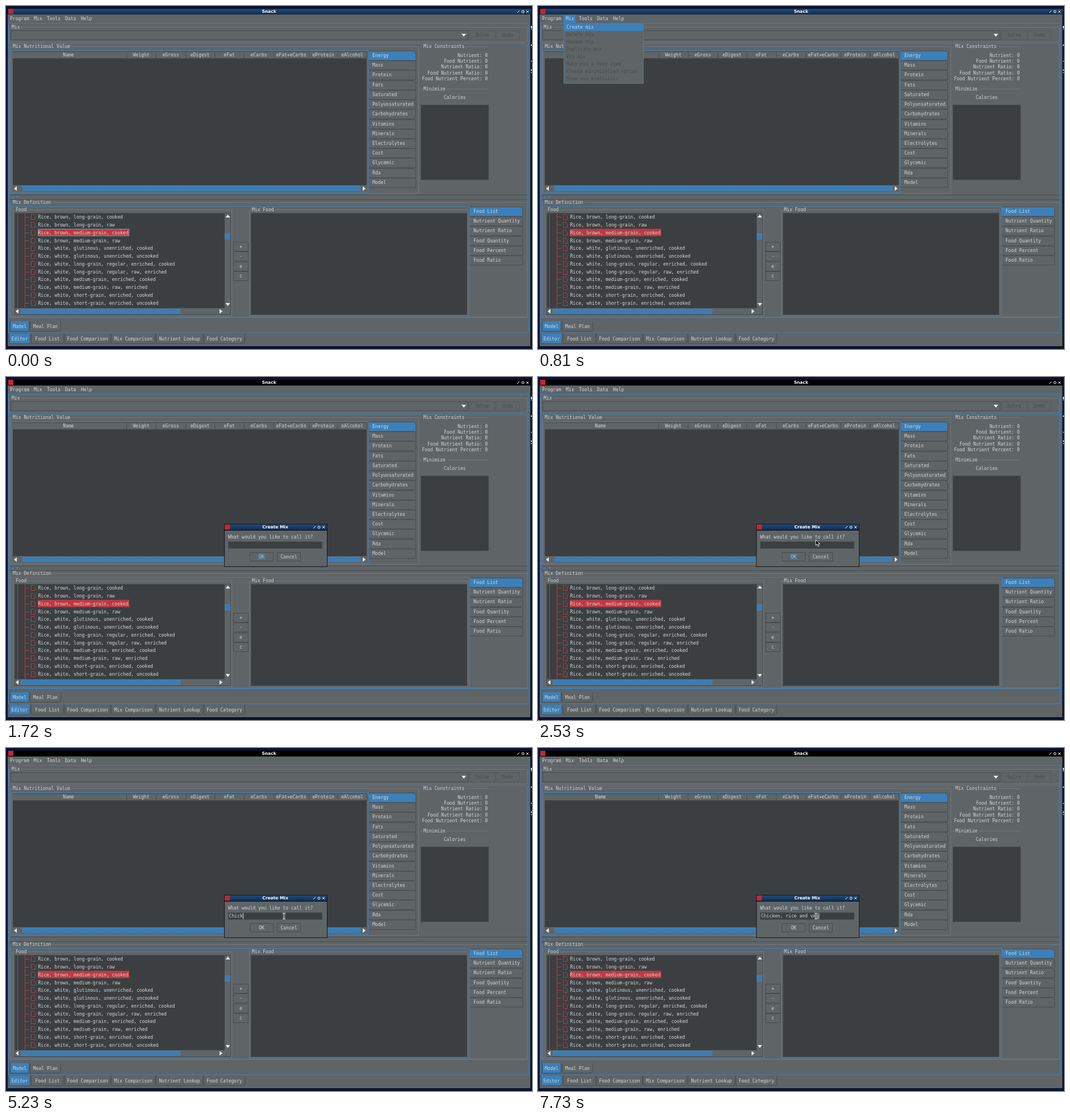
These frames come from a looping animation (926x605 px, 8000 ms). An HTML page with a canvas:

```html
<!DOCTYPE html>
<html lang="en">
<head>
<meta charset="utf-8">
<title>Snack</title>
<style>
html, body { margin: 0; width: 100%; height: 100%; overflow: hidden; background: #0b1238; }
canvas { display: block; }
</style>
</head>
<body>
<canvas id="stage" width="926" height="605"></canvas>
<script>
const ctx = document.getElementById('stage').getContext('2d');
const LOOP = 8000;
const MONO = '8px "DejaVu Sans Mono", monospace';
const BOLD = 'bold 7.5px "DejaVu Sans", sans-serif';
const GREY = '#5f6467', DARK = '#3c3f41', EDGE = '#484c4f', ETCH = '#71777a';
const BLUE = '#3c80b9', RED = '#bd3a42', INK = '#d6d8da', OFF = '#484c4e';

const MENU = ['Create mix', 'Delete mix', 'Rename mix', 'Duplicate mix', 'Pin mix',
  'Make mix a food item', 'Choose minimization option', 'Show mix statistics'];
const GROUPS = ['Energy', 'Mass', 'Protein', 'Fats', 'Saturated', 'Polyunsaturated',
  'Carbohydrates', 'Vitamins', 'Minerals', 'Electrolytes', 'Cost', 'Glycemic', 'Rda', 'Model'];
const DEFS = ['Food List', 'Nutrient Quantity', 'Nutrient Ratio', 'Food Quantity',
  'Food Percent', 'Food Ratio'];
const COLS = [['Name', 212], ['Weight', 264], ['eGross', 316], ['eDigest', 367], ['eFat', 419],
  ['eCarbs', 471], ['eFat+eCarbs', 533], ['eProtein', 584], ['eAlcohol', 635]];
const FOODS = ['brown, long-grain, cooked', 'brown, long-grain, raw',
  'brown, medium-grain, cooked', 'brown, medium-grain, raw',
  'white, glutinous, unenriched, cooked', 'white, glutinous, unenriched, uncooked',
  'white, long-grain, regular, enriched, cooked', 'white, long-grain, regular, raw, enriched',
  'white, medium-grain, enriched, cooked', 'white, medium-grain, raw, enriched',
  'white, short-grain, enriched, cooked', 'white, short-grain, enriched, uncooked'];
const TYPED = 'Chicken, rice and veg';
const KEYS = [4370, 4780, 4890, 5120, 5230, 5400, 5460, 5780, 5930, 6050, 6210, 6310, 6510,
  6680, 6850, 6950, 7050, 7150, 7240, 7470, 7730];

// Pointer stops: time, x, y
const POINTER = [[2070, 457, 264], [2110, 468, 280], [2150, 480, 298], [2190, 487, 307],
  [2370, 487, 304], [2410, 487, 300], [2450, 488, 296], [2490, 488, 291], [2530, 489, 287],
  [3040, 490, 288], [3220, 490, 291], [3270, 490, 292], [3310, 490, 294], [3360, 490, 296],
  [3540, 489, 298], [3810, 489, 297], [3850, 489, 296]];

function fill(x, y, w, h, color) {
  ctx.fillStyle = color;
  ctx.fillRect(x, y, w, h);
}

function frame(x, y, w, h, color) {
  ctx.strokeStyle = color;
  ctx.lineWidth = 1;
  ctx.strokeRect(x + .5, y + .5, w - 1, h - 1);
}

function path(points, color, filled, width = 1) {
  ctx.beginPath();
  points.forEach(([x, y]) => ctx.lineTo(x, y));
  ctx.fillStyle = ctx.strokeStyle = color;
  ctx.lineWidth = width;
  if (filled) ctx.fill(); else ctx.stroke();
}

// y is the middle of the line
function label(s, x, y, color = INK, align = 'left', font = MONO) {
  ctx.font = font;
  ctx.textAlign = align;
  ctx.fillStyle = color;
  ctx.fillText(s, x, Math.round(y + 2.7));
}

// Without a height only the top line is drawn
function titled(s, x, y, w, h) {
  if (h) frame(x, y, w, h, ETCH);
  else fill(x, y, w, 1, ETCH);
  fill(x + 3, y - 1, s.length * 4.82 + 4, 3, GREY);
  label(s, x + 5, y);
}

function button(s, x, y, w, h, ink = INK, edge = EDGE) {
  frame(x, y, w, h, edge);
  label(s, x + w / 2, y + h / 2, ink, 'center');
}

function triangle(x, y, dx, dy) {
  path([[x + dx * 3, y + dy * 3], [x - dx * 2 - dy * 4, y - dy * 2 - dx * 4],
    [x - dx * 2 + dy * 4, y - dy * 2 + dx * 4]], '#eef0f1', true);
}

function thumb(x, y, w, h) {
  fill(x, y, w, h, BLUE);
  ctx.fillStyle = '#31658f';
  for (let j = 2; j < h - 1; j += 2)
    for (let i = 2 + j % 4; i < w - 2; i += 4) ctx.fillRect(x + i, y + j, 1, 1);
}

function tabShape(x, y, w, h, selected, down) {
  ctx.beginPath();
  if (down) {
    ctx.moveTo(x + .5, y);
    ctx.lineTo(x + .5, y + h - .5);
    ctx.lineTo(x + w - 4, y + h - .5);
    ctx.quadraticCurveTo(x + w - .5, y + h - .5, x + w - .5, y + h - 4);
    ctx.lineTo(x + w - .5, y);
  } else {
    ctx.moveTo(x, y + .5);
    ctx.lineTo(x + w - 5, y + .5);
    ctx.quadraticCurveTo(x + w - .5, y + .5, x + w - .5, y + 5);
    ctx.lineTo(x + w - .5, y + h);
    ctx.lineTo(x, y + h);
  }
  ctx.fillStyle = selected ? BLUE : GREY;
  ctx.fill();
  ctx.strokeStyle = EDGE;
  ctx.lineWidth = 1;
  ctx.stroke();
}

function sideTabs(names, x, y, w) {
  names.forEach((s, i) => {
    const top = Math.round(y + i * 17.22);
    tabShape(x, top, w, 17, i === 0, false);
    label(s, x + 6, top + 8);
  });
}

function bottomTabs(tabs, y) {
  tabs.forEach(([s, x, w], i) => {
    tabShape(x, y, w, 18, i === 0, true);
    label(s, x + w / 2, y + 9, INK, 'center');
  });
}

function titleBar(s, x, y, w, h, active) {
  fill(x, y, w, h, '#000');
  if (active) {
    const g = ctx.createLinearGradient(0, y, 0, y + h);
    g.addColorStop(0, '#234b78');
    g.addColorStop(1, '#102c50');
    ctx.fillStyle = g;
    ctx.fillRect(x, y, w, h);
  }
  const mid = y + h / 2, end = x + w;
  fill(x, y, 9, 9, '#c8262b');
  label(s, x + w / 2 - 1, mid - .7, '#fff', 'center', BOLD);
  path([[end - 24, mid + 2], [end - 20, mid - 2]], '#fff');
  ctx.beginPath();
  ctx.arc(end - 14, mid, 2, 0, 7);
  ctx.stroke();
  path([[end - 8, mid - 2], [end - 4, mid + 2]], '#fff');
  path([[end - 8, mid + 2], [end - 4, mid - 2]], '#fff');
}

function drawTable() {
  titled('Mix Nutritional Value', 7, 71, 720, 260);
  frame(9, 78, 629, 251, BLUE);
  fill(12, 80, 623, 236, DARK);
  fill(12, 80, 623, 13, GREY);
  let left = 8;
  for (const [s, right] of COLS) {
    fill(right, 80, 1, 13, EDGE);
    label(s, (left + right) / 2, 86, INK, 'center');
    left = right;
  }
  fill(12, 80, 623, 1, EDGE);
  fill(12, 92, 623, 1, EDGE);
  thumb(29, 317, 595, 9);
  triangle(17, 322, -1, 0);
  triangle(630, 322, 1, 0);
  sideTabs(GROUPS, 639, 79, 83);
}

function drawConstraints() {
  titled('Mix Constraints', 730, 71, 120);
  ['Nutrient: 0', 'Food Nutrient: 0', 'Nutrient Ratio: 0', 'Food Nutrient Ratio: 0',
    'Food Nutrient Percent: 0'].forEach((s, i) => label(s, 848, 87 + i * 10.3, INK, 'right'));
  titled('Minimize', 730, 146, 120);
  label('Calories', 790, 161, INK, 'center');
  fill(730, 174, 120, 133, DARK);
  frame(730, 174, 120, 133, EDGE);
}

function drawTree(focused) {
  titled('Food', 12, 359, 386, 188);
  fill(15, 365, 370, 168, DARK);
  fill(20, 366, 1, 167, RED);
  fill(33, 366, 1, 167, RED);
  FOODS.forEach((s, i) => {
    const y = Math.round(372.4 + i * 13.75);
    fill(33, y, 8, 1, RED);
    path([[44.5, y - 4.5], [49, y - 4.5], [51.5, y - 2], [51.5, y + 4.5], [44.5, y + 4.5],
      [44.5, y - 4.5]], RED);
    if (i === 2) {
      fill(56, y - 7, 161, 13, RED);
      if (focused) frame(56, y - 7, 161, 13, '#6a9cc4');
    }
    label('Rice, ' + s, 56.5, y);
  });
  thumb(385, 401, 11, 11);
  triangle(390.5, 371, 0, -1);
  triangle(390.5, 526, 0, 1);
  thumb(26, 534, 281, 9);
  triangle(20, 538.5, -1, 0);
  triangle(378, 538.5, 1, 0);
  frame(15, 365, 381, 180, EDGE);
}

function drawWindow(t) {
  const dialog = t >= 1720;
  const menuOn = t >= 500 && t < 1660;
  fill(0, 0, 926, 605, '#0b1238');
  [[35, 4], [40, 1], [68, 2], [97, 1], [112, 2], [117, 1]].forEach(([y, h]) => fill(924, y, 2, h, '#d5d8e2'));
  fill(2, 4, 922, 597, '#10151f');
  titleBar('Snack', 4, 5, 920, 10, !dialog);
  fill(3, 15, 920, 585, GREY);

  if (menuOn) fill(45, 16, 21, 14, BLUE);
  [['Program', 7], ['Mix', 49], ['Tools', 72], ['Data', 104], ['Help', 132]]
    .forEach(([s, x]) => label(s, x, 22));

  frame(4, 30, 916, 547, BLUE);
  frame(6, 66, 912, 484, BLUE);
  titled('Mix', 5, 37, 913, 27);
  frame(8, 43, 806, 17, EDGE);
  path([[802, 49], [810, 49], [806, 54]], '#fff', true);
  button('Solve', 816, 43, 45, 17, OFF, '#54595c');
  button('Undo', 862, 43, 42, 17, OFF, '#54595c');

  drawTable();
  drawConstraints();

  fill(7, 333, 911, 1, EDGE);
  fill(7, 341, 911, 1, EDGE);
  path([[9, 339], [15, 339], [12, 335]], BLUE, true);
  path([[17, 335], [23, 335], [20, 339]], BLUE, true);
  titled('Mix Definition', 7, 346, 911, 203);
  frame(9, 353, 808, 196, BLUE);
  drawTree(t < 500);
  ['+', '-', 'e', 'c'].forEach((s, i) => button(s, 400, Math.round(416 + i * 17.4), 27, 17));
  titled('Mix Food', 428, 359, 386, 188);
  fill(431, 365, 381, 180, DARK);
  frame(431, 365, 381, 180, EDGE);
  sideTabs(DEFS, 817, 354, 93);

  bottomTabs([['Model', 7, 34], ['Meal Plan', 42, 55]], 556);
  bottomTabs([['Editor', 5, 38], ['Food List', 44, 58], ['Food Comparison', 103, 81],
    ['Mix Comparison', 185, 78], ['Nutrient Lookup', 264, 83], ['Food Category', 348, 73]], 578);
}

function drawMenu(t) {
  fill(45, 30, 141, 107, GREY);
  frame(45, 30, 141, 107, BLUE);
  if (t >= 810) fill(46, 31, 139, 13, BLUE);
  MENU.forEach((s, i) => label(s, 50, 37 + i * 13.1, i ? OFF : INK));
}

function drawDialog(t) {
  fill(384, 259, 182, 76, '#10151f');
  titleBar('Create Mix', 385, 260, 180, 10, true);
  fill(385, 271, 180, 63, GREY);
  label('What would you like to call it?', 391, 282.2);
  fill(391, 290, 166, 13, DARK);
  frame(391, 290, 166, 13, EDGE);
  const clicked = t >= 3420;
  button('OK', 429, 309, 42, 16, clicked ? INK : '#a9cbe6');
  if (!clicked) frame(444, 312, 12, 10, '#4c7ea8');
  button('Cancel', 477, 309, 42, 16);
  const count = KEYS.filter(k => t >= k).length;
  label(TYPED.slice(0, count), 392.7, 296.2);
  if (count || (clicked && t < 3810)) fill(Math.round(392.7 + count * 4.816), 291, 1, 11, INK);
}

function drawPointer(t) {
  const stop = POINTER.filter(p => t >= p[0]).pop();
  if (!stop) return;
  const [, x, y] = stop;
  if (t < 3220) {
    const arrow = [[0, 0], [0, 10], [2.3, 8], [4.2, 12], [5.8, 11.2], [4, 7.4], [7.2, 7.2], [0, 0]]
      .map(([a, b]) => [x + a, y + b]);
    path(arrow, '#000', true);
    path(arrow, '#fff', false, .9);
  } else {
    fill(x - 2, y - 5, 5, 1, '#fff');
    fill(x - 2, y + 5, 5, 1, '#fff');
    fill(x - 1, y - 4, 3, 9, '#d9dbdc');
    fill(x, y - 4, 1, 9, '#000');
  }
}

function tick() {
  const t = performance.now() % LOOP;
  drawWindow(t);
  if (t >= 540 && t < 1660) drawMenu(t);
  if (t >= 1720) drawDialog(t);
  drawPointer(t);
  requestAnimationFrame(tick);
}
tick();
</script>
</body>
</html>
```
